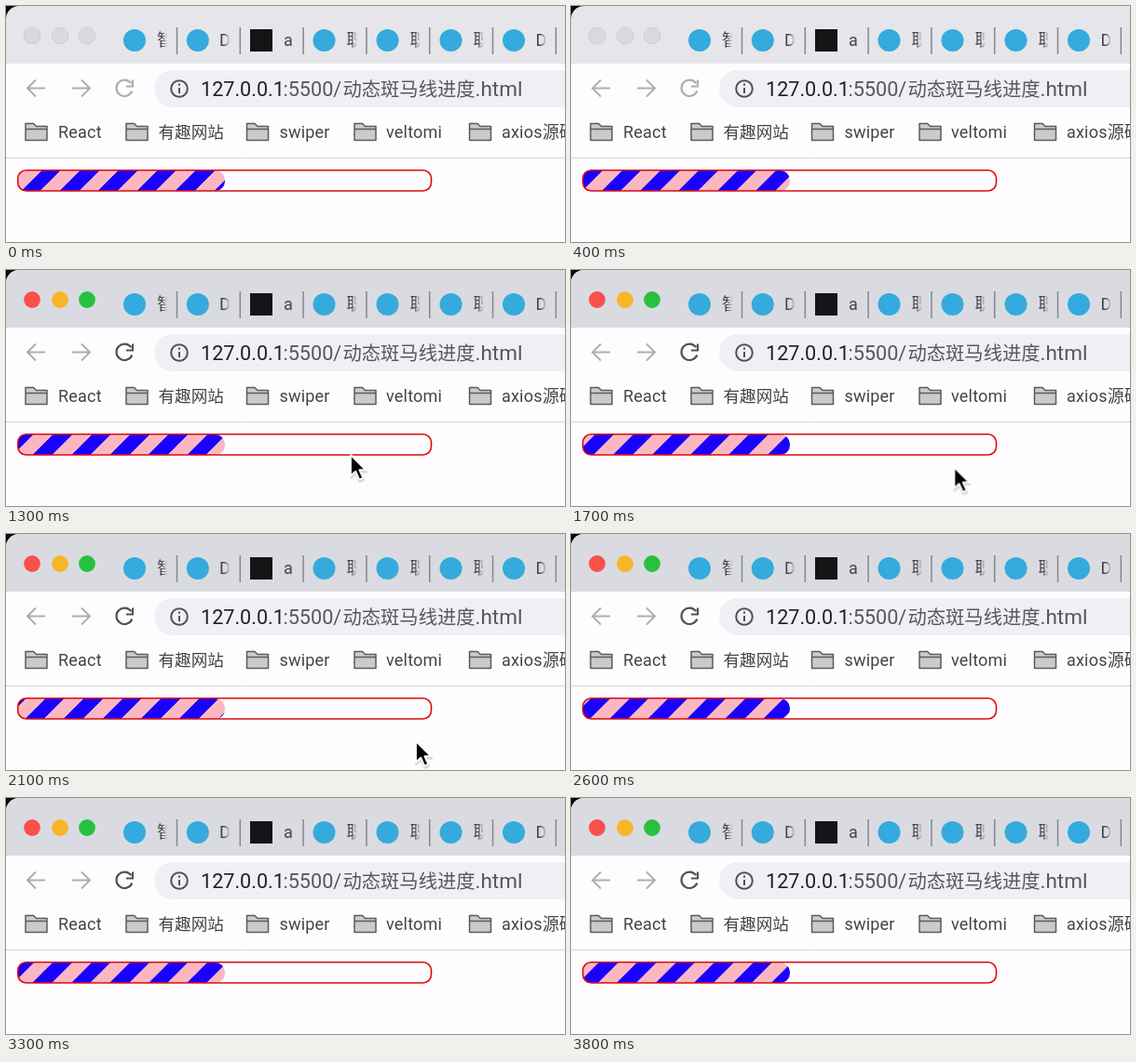
Write an HTML page that moves like this. It is 600 by 254 pixels and loops after 3900 ms.

```html
<!DOCTYPE html>
<html lang="zh">
<head>
<meta charset="utf-8">
<title>Striped progress</title>
<style>
  :root { --loop: 3900ms; --pitch: 41.4px; }
  html, body { margin: 0; width: 100%; height: 100%; overflow: hidden; background: #fefcfe; }
  svg { position: absolute; left: 0; top: 0; width: 600px; height: 254px; }
  text { font-family: Roboto, "Noto Sans CJK SC", "Noto Sans CJK", sans-serif; white-space: pre; }

  .active, .idle, .cursor, .stripes { animation: var(--loop) step-end -1ms infinite; }
  .active { animation-name: focus; }
  .idle { animation-name: blur; }

  .fill {
    position: absolute; left: 13px; top: 177px; width: 222px; height: 22px;
    border-radius: 8px 10.5px 10.5px 8px; overflow: hidden;
  }
  .stripes {
    --unit: calc(var(--pitch) * .70711);
    position: absolute; left: -182px; top: 0; width: 560px; height: 100%;
    background: repeating-linear-gradient(135deg,
      #1a00ff 0 calc(var(--unit) / 2), #fbb7c1 0 var(--unit));
    animation-name: slide; animation-timing-function: steps(39);
  }
  .cursor { animation-name: move, show; }

  @keyframes slide { to { transform: translateX(calc(var(--pitch) * 3.9)); } }
  @keyframes focus { 0% { opacity: 0; } 25.62%, 100% { opacity: 1; } }
  @keyframes blur { 0% { opacity: 1; } 25.62%, 100% { opacity: 0; } }
  @keyframes show {
    0% { visibility: hidden; }
    17.93% { visibility: visible; }
    58.96%, 100% { visibility: hidden; }
  }
  @keyframes move {
    0%, 17.93% { transform: translate(404px, 205px); }
    20.5% { transform: translate(381px, 199px); animation-timing-function: steps(4); }
    30.75%, 38.45% { transform: translate(370px, 199px); animation-timing-function: steps(3); }
    46.14% { transform: translate(432px, 219px); }
    48.7%, 100% { transform: translate(440px, 223px); }
  }
</style>
</head>
<body>
<svg viewBox="0 0 600 254">
  <defs>
    <linearGradient id="fade" gradientUnits="userSpaceOnUse" x1="0" x2="11.500" y1="0" y2="0">
      <stop offset=".45" stop-color="#44464a"/>
      <stop offset="1" stop-color="#44464a" stop-opacity="0"/>
    </linearGradient>
    <circle id="light" r="8.900" cy="32"/>
    <circle id="dot" r="12" cy="37" fill="#35aadc"/>
    <path id="sep" d="M0 23V52" stroke="#85878b" stroke-width="1.500"/>
    <g id="folder" stroke="#5a5b5e" stroke-width="1.500" stroke-linejoin="round">
      <path d="M1 144.500V126.500H9.500L12.500 129.500H24V144.500Z" fill="#cbcbcd"/>
      <path d="M1 132.500H24" fill="none"/>
    </g>
    <path id="reload" d="M134.300 83.200A8.700 8.700 0 1 0 135.300 91.500M136 79.500V86.500H129" fill="none" stroke-width="2.200"/>
    <path id="arrow" d="M0 0V22.500L5.200 17.700 9.200 26.500 13.200 24.700 9.300 16.200H16Z"/>
    <path id="bar" d="M0 62V14A14 14 0 0 1 14 0H600V62Z"/>
  </defs>

  <!-- title bar -->
  <rect width="30" height="30" fill="#08080a"/>
  <use href="#bar" fill="#e5e5ea"/>
  <use href="#bar" class="active" fill="#d9dbe0"/>
  <g class="idle" fill="#d9d9dc" stroke="#cdcdd1">
    <use href="#light" x="28"/><use href="#light" x="58"/><use href="#light" x="87"/>
  </g>
  <g class="active">
    <use href="#light" x="28" fill="#f9504a"/>
    <use href="#light" x="58" fill="#f9b528"/>
    <use href="#light" x="87" fill="#27c13f"/>
  </g>

  <!-- tabs -->
  <use href="#dot" x="138"/><use href="#dot" x="205.800"/><use href="#dot" x="341.500"/>
  <use href="#dot" x="409.500"/><use href="#dot" x="477.500"/><use href="#dot" x="545"/>
  <rect x="262" y="25" width="24" height="24" fill="#141416"/>
  <use href="#sep" x="183.500"/><use href="#sep" x="251.300"/><use href="#sep" x="319.100"/>
  <use href="#sep" x="386.900"/><use href="#sep" x="454.700"/><use href="#sep" x="522.500"/>
  <use href="#sep" x="590.300"/>
  <g font-size="18" fill="url(#fade)">
    <text transform="translate(162 43)">智</text>
    <text transform="translate(229 43)">D</text>
    <text transform="translate(298 43)" fill="#44464a">a</text>
    <text transform="translate(365.500 43)">职</text>
    <text transform="translate(433.500 43)">职</text>
    <text transform="translate(501.500 43)">职</text>
    <text transform="translate(568.500 43)">D</text>
  </g>

  <!-- toolbar -->
  <rect y="62" width="600" height="101" fill="#fefcfe"/>
  <g fill="none" stroke-width="2" stroke="#adaeb1">
    <path d="M42 88.500H23.500M32 79.500L23 88.500 32 97.500"/>
    <path d="M71 88.500H89.500M81 79.500L90 88.500 81 97.500"/>
  </g>
  <use href="#reload" class="idle" stroke="#adaeb1"/>
  <use href="#reload" class="active" stroke="#505256"/>
  <rect x="159" y="69" width="480" height="40" rx="20" fill="#eff0f4"/>
  <g fill="none" stroke="#505256" stroke-width="2">
    <circle cx="186" cy="89" r="8.800"/>
    <path d="M186 88V94M186 83.500V85.700"/>
  </g>
  <g font-size="21.600" fill="#55575b">
    <text x="209" y="96.500" fill="#202124">127.0.0.1</text>
    <text x="297.500" y="96.500">:5500/</text>
    <text x="361.500" y="96.500" font-size="20.300">动态斑马线进度</text>
    <text x="503.500" y="96.500" font-size="22.500">.html</text>
  </g>

  <!-- bookmarks -->
  <use href="#folder" x="20"/><use href="#folder" x="128"/><use href="#folder" x="257.500"/>
  <use href="#folder" x="373"/><use href="#folder" x="496.500"/>
  <g font-size="18" letter-spacing=".2" fill="#434447">
    <text x="56" y="142">React</text>
    <text x="163.500" y="142" font-size="17.600" letter-spacing="0">有趣网站</text>
    <text x="293.500" y="142">swiper</text>
    <text x="408" y="142">veltomi</text>
    <text x="532" y="142">axios源码</text>
  </g>
  <path d="M0 163.500H600" stroke="#d6d5d8"/>
</svg>

<div class="fill"><div class="stripes"></div></div>

<svg viewBox="0 0 600 254">
  <rect x="12.700" y="176.700" width="443.800" height="22.300" rx="9" fill="none" stroke="#dc0c10" stroke-width="1.600"/>
  <g class="cursor">
    <use href="#arrow" x=".5" y="2" fill="none" stroke="#000" stroke-opacity=".14" stroke-width="3" stroke-linejoin="round"/>
    <use href="#arrow" fill="#050505" stroke="#fff" stroke-width="1.800" stroke-linejoin="round"/>
  </g>
</svg>
</body>
</html>
```
